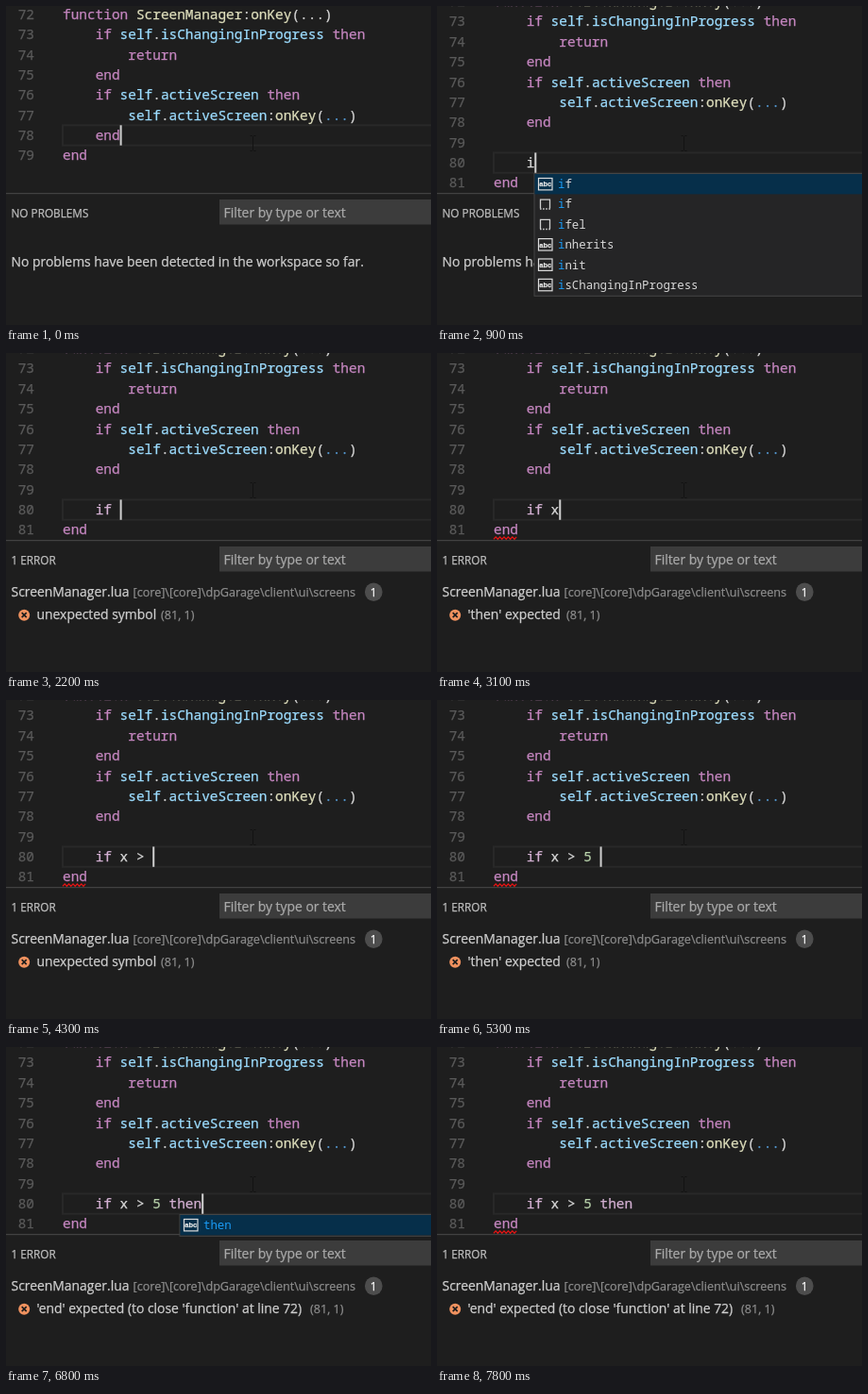
These frames come from a looping animation (450x338 px, 8000 ms). An HTML page:

```html
<!DOCTYPE html>
<html lang="en">
<head>
<meta charset="utf-8">
<title>Lua linting in an editor</title>
<style>
html, body { margin: 0; width: 100%; height: 100%; overflow: hidden; background: #1e1e1e; }
svg { display: block; width: 100vw; height: 100vh; }
text { white-space: pre; stroke-width: .25; }
.code { font: 14.43px "Noto Sans Mono", monospace; }
.item { font: 12.38px "Noto Sans Mono", monospace; }
.ui { font: 13.92px "Open Sans", "Noto Sans", sans-serif; }
.small { font: 12.6px "Open Sans", "Noto Sans", sans-serif; }
.title { font: 11.75px "Open Sans", "Noto Sans", sans-serif; }
.abc { font: 700 7.5px "Liberation Sans", sans-serif; }
</style>
</head>
<body>
<svg id="stage" viewBox="0 0 450 338"></svg>
<script>
const LOOP = 8000, LINE = 21.375, ADV = 8.658, LEFT = 60;
const GREY = '#d8d8d8', PINK = '#c586c0', PALE = '#d3b0d2', SKY = '#9cdcfe', BLUE = '#569cd6',
      CREAM = '#dedebc', GREEN = '#b5cea8', DIM = '#8c8c8c', UI = '#cfcfcf';

const HEAD = [
  'function ScreenManager:onKey(...)',
  '    if self.isChangingInProgress then',
  '        return',
  '    end',
  '    if self.activeScreen then',
  '        self.activeScreen:onKey(...)',
  '    end'
];

// error: message, position, x of the position
const ASSIGN = ["'=' expected", '(81, 1)', 122];
const SYMBOL = ['unexpected symbol', '(81, 1)', 164];
const THEN = ["'then' expected", '(81, 1)', 137];
const THEN80 = ["'then' expected", '(80, 11)', 137];
const END = ["'end' expected (to close 'function' at line 72)", '(81, 1)', 322];

const LIST_I = ['if', '*if', '*ifel', 'inherits', 'init', 'isChangingInProgress'];
const LIST_IF = LIST_I.slice(0, 3);
const LIST_T = ['then', 'true', 'table', 'tonumber', 'tostring', 'type', 'target', 'transition'];
const LIST_TH = ['then'];

// at: start time, add: new lines, typed: text on line 80, menu: [x, items, prefix length]
const STEPS = [
  { at: 0, add: 0 },
  { at: 300, add: 1 },
  { at: 600, typed: '' },
  { at: 900, typed: 'i', menu: [103, LIST_I, 1] },
  { at: 1200, typed: 'i', err: ASSIGN, menu: [103, LIST_I, 1] },
  { at: 1600, typed: 'if', err: ASSIGN, menu: [103, LIST_IF, 2] },
  { at: 1900, typed: 'if ', err: ASSIGN },
  { at: 2200, typed: 'if ', err: SYMBOL },
  { at: 2500, typed: 'if ', err: SYMBOL, wave: 'end' },
  { at: 2800, typed: 'if x', err: SYMBOL, wave: 'end' },
  { at: 3100, typed: 'if x', err: THEN, wave: 'end' },
  { at: 3400, typed: 'if x ', err: THEN, wave: 'end' },
  { at: 3700, typed: 'if x >', err: THEN, wave: 'end' },
  { at: 4000, typed: 'if x > ', err: THEN, wave: 'end' },
  { at: 4300, typed: 'if x > ', err: SYMBOL, wave: 'end' },
  { at: 4700, typed: 'if x > 5', err: SYMBOL, wave: 'end' },
  { at: 5000, typed: 'if x > 5', err: THEN, wave: 'end' },
  { at: 5300, typed: 'if x > 5 ', err: THEN, wave: 'end' },
  { at: 5600, typed: 'if x > 5 t', err: THEN, menu: [184, LIST_T, 1] },
  { at: 5900, typed: 'if x > 5 th', err: THEN80, wave: 't', menu: [184, LIST_TH, 2] },
  { at: 6200, typed: 'if x > 5 the', err: THEN80, wave: 't', menu: [184, LIST_TH, 3] },
  { at: 6500, typed: 'if x > 5 then', err: THEN80, menu: [184, LIST_TH, 4] },
  { at: 6800, typed: 'if x > 5 then', err: END, menu: [184, LIST_TH, 4] },
  { at: 7100, typed: 'if x > 5 then', err: END },
  { at: 7400, typed: 'if x > 5 then', err: END, wave: 'end' },
  { at: 7800, typed: 'if x > 5 then', err: END, wave: 'end', blink: true }
];

const esc = s => s.replace(/&/g, '&amp;').replace(/</g, '&lt;').replace(/>/g, '&gt;');
const text = (x, y, s, cls, fill, more = '') =>
  `<text x="${x}" y="${y}" class="${cls}" fill="${fill}" stroke="${fill}" ${more}>${esc(s)}</text>`;
const rect = (x, y, w, h, fill, more = '') =>
  `<rect x="${x}" y="${y}" width="${w}" height="${h}" fill="${fill}" ${more}/>`;
const path = (d, stroke, width = 1, more = '') =>
  `<path d="${d}" fill="none" stroke="${stroke}" stroke-width="${width}" ${more}/>`;

function colour(word, line, fresh) {
  if (/^(function|if|then|return|end)$/.test(word)) return fresh ? PALE : PINK;
  if (/^(self|isChangingInProgress|activeScreen)$/.test(word)) return SKY;
  if (/^(ScreenManager|onKey)$/.test(word)) return CREAM;
  if (/^\d+$/.test(word)) return GREEN;
  if (word === '...') return line.startsWith('function') ? GREY : BLUE;
  return GREY;
}

function codeLine(line, y, fresh) {
  return [...line.matchAll(/\w+|\.{3}|[^\w\s]/g)]
    .map(m => text(LEFT + m.index * ADV, y, m[0], 'code', colour(m[0], line, fresh))).join('');
}

function wave(x, w, y) {
  let d = `M${x} ${y}`;
  for (let i = 1; i * 2.2 <= w; i++) d += `L${x + i * 2.2} ${y + (i % 2 ? -2.4 : 0)}`;
  return path(d, '#e51414', 1.2);
}

function editor(s) {
  const long = s.typed !== undefined;
  const lines = long ? [...HEAD, '', '    ' + s.typed, 'end']
    : [...HEAD, ...(s.add ? ['    '] : []), 'end'];
  const mid = long ? -4.9 : 8.75;
  const row = lines.length - 2;
  const top = mid + row * LINE - LINE / 2;
  let out = rect(LEFT, top, 400, LINE, 'none', 'stroke="#282828" stroke-width="2"');
  lines.forEach((line, i) => {
    const y = mid + i * LINE + 5;
    out += text(12.7, y, String(72 + i), 'code', '#5a5a5a') + codeLine(line, y, long && i === row);
  });
  if (s.wave === 'end') out += wave(LEFT, 3 * ADV, top + LINE * 2 - .9);
  if (s.wave === 't') out += wave(LEFT + 13 * ADV, 1.2 * ADV, top + LINE + .6);
  if (!s.blink) out += rect(LEFT + lines[row].length * ADV, top, 2, LINE, '#d0d0d0');
  return out;
}

function pointer() {
  return path('M258.5 137.5H260.5L261.5 138.5L262.5 137.5H264.5M261.5 138.5V152.5M258.5 153.5H260.5L261.5 152.5L262.5 153.5H264.5', '#121212');
}

function panel(err) {
  let out = rect(0, 198, 450, 140, '#1e1e1e') + rect(0, 198, 450, 1.2, '#424242')
    + rect(226, 205, 224, 26.5, '#3c3c3c')
    + text(230.5, 224, 'Filter by type or text', 'ui', '#a9a9a9')
    + text(5.5, 223.5, err ? '1 ERROR' : 'NO PROBLEMS', 'title', '#bebebe');
  if (!err) return out + text(5.5, 276, 'No problems have been detected in the workspace so far.', 'ui', UI);
  const [msg, pos, x] = err;
  return out + text(5.5, 258, 'ScreenManager.lua', 'ui', UI)
    + text(134.5, 258, '[core]\\[core]\\dpGarage\\client\\ui\\screens', 'small', DIM)
    + rect(380, 243.5, 18.5, 19.5, '#4d4d4d', 'rx="9.25"')
    + text(389.2, 257.5, '1', 'title', '#ffffff', 'text-anchor="middle"')
    + '<circle cx="19.2" cy="277.7" r="6" fill="#f0925f"/>'
    + path('M16.7 275.2l5 5m0 -5l-5 5', '#1e1e1e', 1.7)
    + text(32.5, 282.4, msg, 'ui', UI) + text(x, 282.4, pos, 'small', DIM);
}

function icon(x, y, snippet) {
  if (snippet) return path(`M${x + 2.5} ${y + 4.5}V${y - 5}H${x + 12.5}V${y + 4.5}`, '#d0d0d0', 1.3)
    + path(`M${x + 2} ${y + 5}H${x + 13}`, '#d0d0d0', 1.4, 'stroke-dasharray="1.6 1.5"');
  return rect(x + .5, y - 6.2, 14.5, 12.4, 'none', 'stroke="#dcdcdc" stroke-width="1.2"')
    + text(x + 7.75, y + 2.7, 'abc', 'abc', '#e8e8e8', 'text-anchor="middle"');
}

function menu([x, items, typed]) {
  const top = 177.5;
  let out = rect(x, top, 400, items.length * LINE + 1.5, '#252526', 'stroke="#454545"')
    + rect(x + .5, top + .5, 400, LINE, '#062f4a');
  items.forEach((item, i) => {
    const y = top + .5 + (i + .5) * LINE, name = item.replace('*', '');
    out += icon(x + 4, y, item !== name)
      + `<text x="${x + 25}" y="${y + 4.4}" class="item" fill="${GREY}">`
      + `<tspan fill="#1a9bf5">${name.slice(0, typed)}</tspan>${name.slice(typed)}</text>`;
  });
  return out;
}

const stage = document.getElementById('stage');
let shown = null;

function draw() {
  const now = performance.now() % LOOP;
  const step = STEPS.findLast(s => s.at <= now);
  if (step !== shown) {
    shown = step;
    stage.innerHTML = editor(step) + pointer() + panel(step.err) + (step.menu ? menu(step.menu) : '');
  }
  requestAnimationFrame(draw);
}
draw();
</script>
</body>
</html>
```
